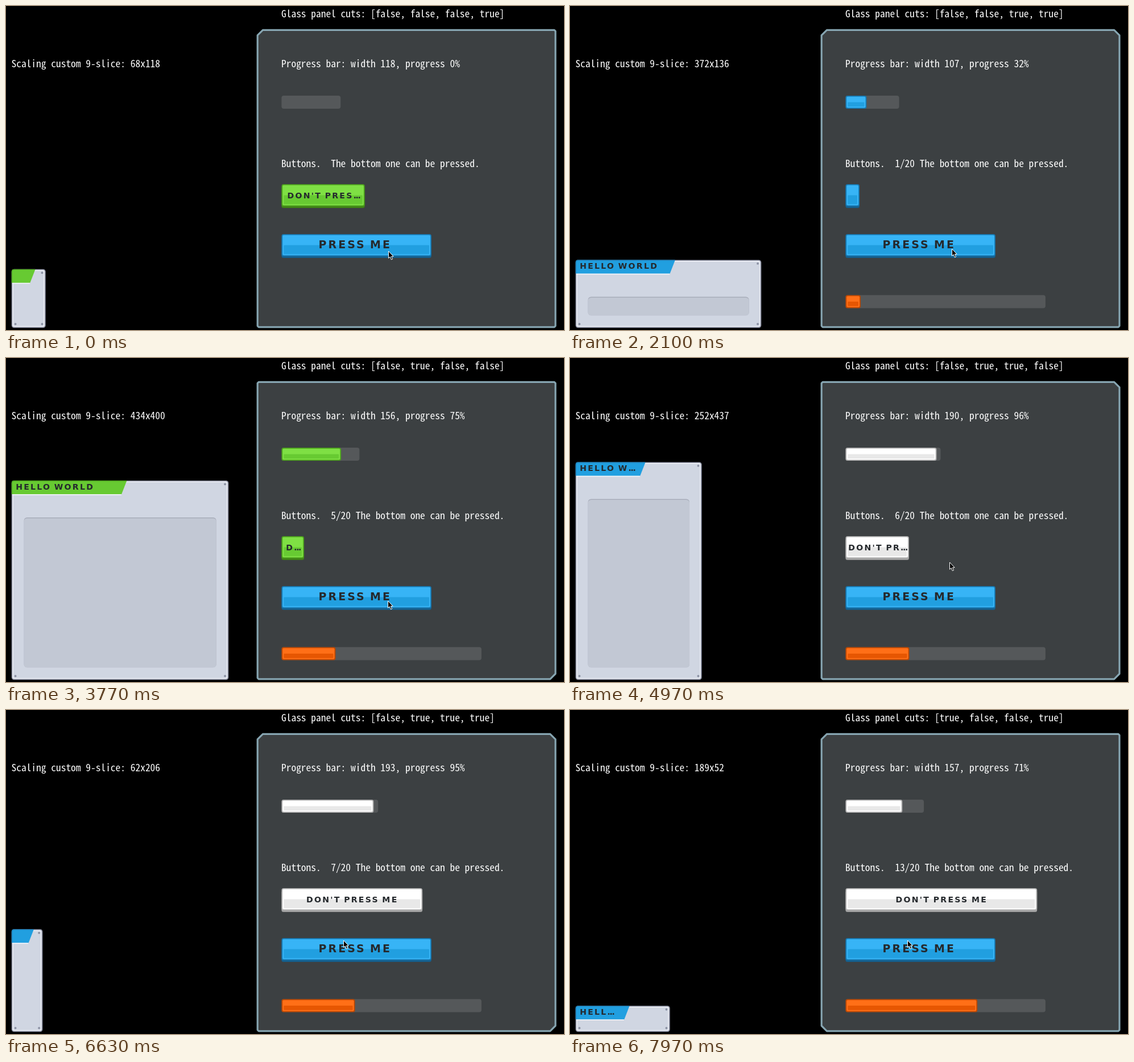
These frames come from a looping animation (981x571 px, 8 s). An HTML page:

```html
<!DOCTYPE html>
<html lang="en">
<head>
<meta charset="utf-8">
<title>UI widgets</title>
<style>
  html, body { margin: 0; width: 100%; height: 100%; overflow: hidden; background: #000; }
  svg { display: block; }
  text { white-space: pre; }
  .mono { fill: #fff; font-family: "Noto Sans Mono CJK JP", "Noto Sans Mono", monospace; }
  .label { fill: #25292d; font-family: "DejaVu Sans", sans-serif; font-weight: 700; letter-spacing: .16em; word-spacing: -.12em; }
  .dots { letter-spacing: -1.4px; }
</style>
</head>
<body>
<svg id="stage" width="981" height="571" viewBox="0 0 981 571"></svg>
<script>
const LOOP = 8, SCALE = 0.877;
const LABEL_SIZE = 14.1, BIG_LABEL_SIZE = 19, DOTS_WIDTH = 11;
const FLOOR_Y = 567.3, LEFT = 10, COLUMN = 484.4;

const THEMES = {
  green:  { light: '#7fe044', dark: '#67ca32', edge: '#4c9f1d', lip: '#3f8216' },
  orange: { light: '#ff6f17', dark: '#e65602', edge: '#b94602', lip: '#963a03' },
  blue:   { light: '#37b4f6', dark: '#219fe0', edge: '#1878b0', lip: '#145f8d' },
  white:  { light: '#ffffff', dark: '#e8e8e8', edge: '#b3b3b3', lip: '#a2a2a2' }
};
const THEME_TIMES = [[0, 'green'], [0.8, 'orange'], [2, 'blue'], [3.3, 'green'], [4.3, 'white']];
const PRESS_TIMES = [1.75, 2.2, 2.65, 3.1, 3.5, 4.2, 6.45, 6.8, 7, 7.2, 7.4, 7.6, 7.8];
const POINTER = [[0, 672, 432], [0.5, 672, 432], [0.9, 671, 428], [4.3, 671, 428],
                 [4.8, 667, 360], [5.4, 667, 360], [6.2, 593, 406], [8, 593, 406]];

const ruler = document.createElement('canvas').getContext('2d');
ruler.font = '100px "Noto Sans Mono CJK JP", "Noto Sans Mono", monospace';
const MONO_SIZE = 8.72 / ruler.measureText('0').width * 100;
ruler.font = `700 ${LABEL_SIZE}px "DejaVu Sans", sans-serif`;
ruler.letterSpacing = `${LABEL_SIZE * 0.16}px`;
ruler.wordSpacing = `${LABEL_SIZE * -0.12}px`;
const labelWidth = s => ruler.measureText(s).width;

const wave = (mid, amp, speed, phase, t) => mid - amp * Math.cos(speed * t + phase);

const rect = (x, y, w, h, fill, r = 0) =>
  `<rect x="${x}" y="${y}" width="${Math.max(0, w)}" height="${Math.max(0, h)}" rx="${r}" fill="${fill}"/>`;

const mono = (x, y, s) => `<text class="mono" x="${x}" y="${y}" font-size="${MONO_SIZE}">${s}</text>`;

function label(x, y, s, size = LABEL_SIZE, dots = false) {
  const tail = dots ? '<tspan class="dots">...</tspan>' : '';
  return `<text class="label" x="${x}" y="${y}" font-size="${size}">${s}${tail}</text>`;
}

// Longest prefix that fits, with an ellipsis when shortened.
function fit(s, room) {
  if (labelWidth(s) <= room) return { s, dots: false, width: labelWidth(s) };
  for (let n = s.length - 1; n > 0; n--) {
    const head = s.slice(0, n), width = labelWidth(head) + DOTS_WIDTH;
    if (width <= room) return { s: head, dots: true, width };
  }
  return null;
}

function bevel(x, y, w, h, c) {
  const half = h / 2;
  return rect(x, y, w, h, c.edge, 3.5)
    + rect(x + 1.8, y + 1.8, w - 3.6, h - 3.6, c.light, 2)
    + rect(x + 4, y + half, w - 8, half - 3.8, c.dark, 1);
}

const button = (y, w, c) => rect(COLUMN, y + 4, w, 38, c.lip, 3.5) + bevel(COLUMN, y, w, 39, c);

function progressBar(y, w, p, c) {
  const track = rect(COLUMN, y, w, 23, '#55585a', 4);
  const least = 9.5;
  return track + (p >= 0.005 ? bevel(COLUMN, y, least + (w - least) * p, 23, c) : '');
}

function windowPanel(w, h, c) {
  const top = FLOOR_Y - h, right = LEFT + w;
  const tab = LEFT + 11.5 + w / 2, tabBottom = top + 24;
  const rivet = (x, y) => `<circle cx="${x}" cy="${y}" r="1.9" fill="#8b91a3"/>`;
  let out = rect(LEFT - 0.3, top, w + 0.3, h, '#8f94a6', 4.5)
    + rect(LEFT + 1.3, top + 1.6, w - 3.1, h - 3.4, '#f2f4f9', 3)
    + rect(LEFT + 2.8, top + 3.1, w - 6.1, h - 6.4, '#d0d6e2', 2)
    + `<path d="M${LEFT + 1} ${tabBottom + 0.8}H${tab - 9.5}" stroke="#f2f4f9" stroke-width="2"/>`
    + `<path d="M${LEFT + 0.7} ${tabBottom}V${top + 4}q0 -3.2 3.2 -3.2H${tab}L${tab - 9} ${tabBottom}Z" fill="${c.dark}"/>`
    + `<path d="M${LEFT + 0.3} ${tabBottom}V${top + 4.4}q0 -3.8 3.8 -3.8H${tab}" fill="none" stroke="${c.edge}" stroke-width="1.3"/>`
    + rivet(right - 6.3, top + 6.5) + rivet(right - 6.3, FLOOR_Y - 6.8) + rivet(LEFT + 6.6, FLOOR_Y - 6.8);
  const innerW = w - 43.3, innerH = h - 87;
  if (innerW > 20 && innerH > 20) {
    out += rect(LEFT + 21.6, top + 65, innerW, innerH, '#a8adba', 5.5)
      + rect(LEFT + 21.6, top + 66.5, innerW, innerH - 1.5, '#c2c8d4', 5.5);
  }
  const title = fit('HELLO WORLD', tab - LEFT - 22);
  return title ? out + label(17.2, top + 16, title.s, LABEL_SIZE, title.dots) : out;
}

// Cut flags run bottom-left, bottom-right, top-right, top-left.
function glassPanel([bl, br, tr, tl]) {
  const x0 = 442.2, y0 = 42.3, x1 = 966, y1 = 565.8;
  const size = cut => cut ? 9.3 : 2;
  const a = size(tl), b = size(tr), c = size(br), d = size(bl);
  return `<path d="M${x0 + a} ${y0}H${x1 - b}L${x1} ${y0 + b}V${y1 - c}L${x1 - c} ${y1}H${x0 + d}L${x0} ${y1 - d}V${y0 + a}Z"
    fill="#3c4042" stroke="#86a5b1" stroke-width="3.2" stroke-linejoin="round"/>`;
}

function pointer(t) {
  const i = POINTER.findIndex(p => p[0] > t);
  const [ta, xa, ya] = POINTER[i - 1], [tb, xb, yb] = POINTER[i];
  const k = (t - ta) / (tb - ta), e = k * k * (3 - 2 * k);
  return `<path transform="translate(${xa + (xb - xa) * e} ${ya + (yb - ya) * e})"
    d="M.5 0V12.5L3.3 10L5.4 15L7.6 14L5.5 9.3H9.2Z" fill="#000" stroke="#fff"/>`;
}

function scene(t) {
  const sliceW = wave(262, 200, 0.9075, 0.247, t), sliceH = wave(249, 200, 0.8725, -0.8585, t);
  const barW = wave(150, 50, 0.685, -0.8884, t), progress = wave(0.5, 0.5, 0.524, 0.112, t);
  const buttonW = wave(219.5, 200, 0.482, -1.305, t) * SCALE;
  const presses = PRESS_TIMES.filter(p => p <= t).length;
  const theme = THEME_TIMES.filter(s => s[0] <= t).pop()[1];
  const color = THEMES[theme], panelColor = theme === 'white' ? THEMES.blue : color;
  const counter = Math.floor(t + 0.2) + 1;
  const cuts = [8, 4, 2, 1].map(bit => (counter & bit) > 0);
  const caption = fit("DON'T PRESS ME", buttonW - 7.5);
  const count = presses ? `${presses}/20 ` : '';

  return glassPanel(cuts)
    + mono(484, 20, `Glass panel cuts: [${cuts.join(', ')}]`)
    + mono(9.5, 108, `Scaling custom 9-slice: ${Math.floor(sliceW)}x${Math.floor(sliceH)}`)
    + windowPanel(sliceW * SCALE, sliceH * SCALE, panelColor)
    + mono(484, 108, `Progress bar: width ${Math.floor(barW)}, progress ${Math.round(progress * 100)}%`)
    + progressBar(158, barW * SCALE, progress, color)
    + mono(484, 284, `Buttons.  ${count}The bottom one can be pressed.`)
    + button(314, buttonW, color)
    + (caption ? label(COLUMN + (buttonW - caption.width) / 2 + 0.5, 338.5, caption.s, LABEL_SIZE, caption.dots) : '')
    + button(402, 263.5, THEMES.blue)
    + label(549.5, 427, 'PRESS ME', BIG_LABEL_SIZE)
    + (presses ? progressBar(509.5, 351.5, presses / 20, THEMES.orange) : '')
    + pointer(t);
}

const stage = document.getElementById('stage');
function tick() {
  stage.innerHTML = scene(performance.now() / 1000 % LOOP);
  requestAnimationFrame(tick);
}
tick();
</script>
</body>
</html>
```
